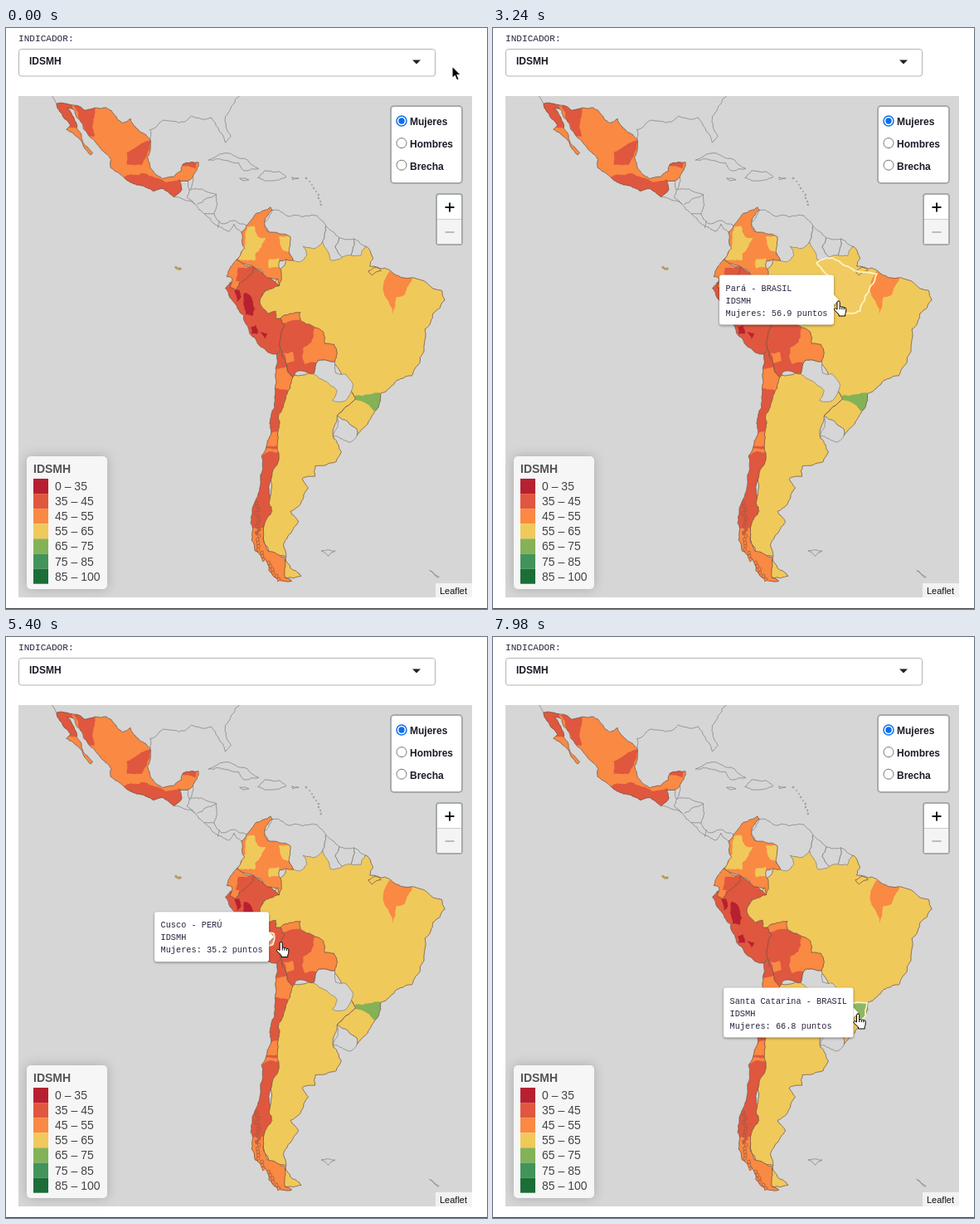
An HTML page for the animation above (8000 ms loop, 580 by 700 pixels).

```html
<!DOCTYPE html>
<html lang="es">
<head>
<meta charset="utf-8">
<title>Mapa IDSMH</title>
<style>
  html, body { margin: 0; width: 100%; height: 100%; overflow: hidden; background: #fff; }
  svg { display: block; }
  text { font-family: "Liberation Sans", Arial, sans-serif; white-space: pre; }
  .mono { font-family: "Liberation Mono", "Noto Sans Mono", monospace; fill: #29243f; }
  .bold { font-weight: bold; font-size: 12px; fill: #1c1a28; }
  .panel { fill: #fff; stroke: #a5abab; stroke-width: 2; }
  .legend { filter: drop-shadow(0 0 7px rgba(0,0,0,.2)); }
  #tip rect, #tip path { fill: #fff; }
  #tip { filter: drop-shadow(0 1px 1.5px rgba(0,0,0,.45)); }
</style>
</head>
<body>
<svg width="580" height="700" viewBox="0 0 580 700">
  <defs><clipPath id="frame"><rect x="15" y="82" width="547" height="604"/></clipPath></defs>
  <rect y="699" width="580" height="1" fill="#444"/>
  <text class="mono" x="15" y="16" font-size="11.1">INDICADOR:</text>
  <rect x="15.5" y="25.5" width="502" height="32.5" rx="3" fill="#fff" stroke="#b3b3b3"/>
  <text class="bold" x="28" y="44">IDSMH</text>
  <path d="M490 38.500h10l-5 5z" fill="#222"/>

  <rect x="15" y="82" width="547" height="604" fill="#d6d6d6"/>
  <g id="map" clip-path="url(#frame)" stroke-linejoin="round"></g>

  <rect class="panel" x="464" y="94" width="86" height="93" rx="4"/>
  <g id="radios"></g>
  <rect class="panel" x="519" y="200" width="31" height="61" rx="3"/>
  <path d="M520 231h29v29h-29z" fill="#f4f4f4"/>
  <path d="M520 230.500h29" stroke="#ccc"/>
  <path d="M529.500 216h11m-5.500-5.500v11" stroke="#111" stroke-width="2"/>
  <path d="M529.500 246h11" stroke="#bbb" stroke-width="2"/>

  <rect class="legend" x="25" y="516" width="97" height="160" rx="5" fill="#f6f6f6"/>
  <text x="33" y="536" font-size="14" font-weight="bold" fill="#555">IDSMH</text>
  <g id="legend"></g>
  <rect x="518" y="669" width="44" height="17" fill="#f2f2f2"/>
  <text x="523" y="682" font-size="11" fill="#111">Leaflet</text>

  <g id="tip" font-size="10.25">
    <rect height="60" rx="3"/>
    <path/>
    <text class="mono" x="7.500" y="19"></text>
    <text class="mono" x="7.500" y="34">IDSMH</text>
    <text class="mono" x="7.500" y="49"></text>
  </g>
  <path id="arrow" d="M0 0V14.500L3.300 11.600 5.600 17 8.300 15.800 6 10.600H10.500Z" fill="#000" stroke="#fff" stroke-width="1.100"/>
  <path id="hand" d="M0 10V1.600a1.600 1.600 0 0 1 3.200 0V7q1.500-1 2.600.3 1.500-.8 2.500.5 2.200-.4 2.400 1.500V12q0 2-1 3.500V18H2V16L-3.300 11q-1-1.600.5-2.200Q-1.500 8.600 0 10zM3.200 7v3M5.800 7.500v2.700M8.300 8v2.400" fill="#fff" stroke="#000"/>
</svg>
<script>
const DEEP = '#b72031', RED = '#df573e', ORANGE = '#f98943', YELLOW = '#f0c95b', GREEN = '#84b256', GREY = '#d6d6d6';
const $ = id => document.getElementById(id);
const map = $('map');

function add(parent, tag, attrs, text) {
  const node = document.createElementNS('http://www.w3.org/2000/svg', tag);
  for (const key in attrs) node.setAttribute(key, attrs[key]);
  if (text) node.textContent = text;
  parent.append(node);
  return node;
}

// Web Mercator; places are written as "degrees west,degrees north".
const project = ([west, north]) =>
  [727 - 5.689 * west, 287 - 326 * Math.asinh(Math.tan(north * Math.PI / 180))];

const noise = n => { const v = Math.sin(n) * 43758.5453; return v - Math.floor(v) - 0.5; };

// Roughens an edge by displacing midpoints, alike in either direction.
function bend(a, b) {
  const dx = b[0] - a[0], dy = b[1] - a[1];
  if (Math.hypot(dx, dy) < 4) return [b];
  const side = dx > 0 || (dx === 0 && dy > 0) ? 1 : -1;
  const k = side * 0.24 * noise((a[0] + b[0]) * 12.9898 + (a[1] + b[1]) * 78.233);
  const mid = [(a[0] + b[0]) / 2 - dy * k, (a[1] + b[1]) / 2 + dx * k];
  return [...bend(a, mid), ...bend(mid, b)];
}

function outline(places, closed = true) {
  const pts = places.split(' ').map(p => project(p.split(',').map(Number)));
  if (closed) pts.push(pts[0]);
  const line = [pts[0], ...pts.slice(1).flatMap((p, i) => bend(pts[i], p))];
  return 'M' + line.map(p => p.map(v => v.toFixed(1))).join('L') + (closed ? 'Z' : '');
}

const stroke = (d, color = '#808080', fill = 'none') =>
  add(map, 'path', { d, fill, stroke: color, 'stroke-width': 0.75 });
const coast = places => stroke(outline(places, false));
const band = (north, south) => `78,${north} 65,${north} 65,${south} 78,${south}`;
const dot = (cx, cy, r, fill, color = '#808080') =>
  add(map, 'circle', { cx, cy, r, fill, stroke: color, 'stroke-width': 0.7 });

// Paints one country; regions may overflow, as they are clipped to it.
let clips = 0;
function land(places, fill = GREY, regions = []) {
  const d = outline(places), id = 'land' + clips++;
  add(add(map, 'clipPath', { id }), 'path', { d });
  const group = add(map, 'g', { 'clip-path': `url(#${id})` });
  add(group, 'path', { d, fill });
  for (const [color, area] of regions) add(group, 'path', { d: outline(area), fill: color });
  stroke(d, fill === GREY ? '#808080' : '#70503f');
}

// North and Central America
coast('118.5,34.2 117.1,32.5');
coast('97.2,25.9 97.3,27.8 94.5,29.5 90,29.2 88.5,30.3 84.3,30 82.8,28 81.3,25.3 80.1,26.5 81.3,30.2 78,34.2');
coast('92.2,14.5 90,13.9 87.7,13 85.8,11 83.7,9 80.4,7.4 79.5,8.9 77.9,7.2');
coast('88.2,18.5 88.9,15.9 86,16 83.2,15 83.7,11 82.2,9 79.6,9.6 76.8,8.6');
coast('91,17.8 89.2,17.8 88.9,15.9 89.4,14.4 87.7,13');
coast('83.2,15 87.3,13');
coast('83.7,11 85.7,11.1');
coast('82.6,9.6 82.9,8.1');
land('84.9,21.9 82.5,23.1 79.5,22.8 74.2,20.2 77.5,19.9 78.5,21.4');
land('74.4,18.4 73,19.8 70,19.7 68.4,18.6 71.4,17.8');
land('78.3,18.3 76.3,18 77.5,17.8');
land('67.2,18.5 65.7,18.3 67,18');
for (let i = 0; i < 9; i++)
  dot(363 + 16 * Math.sin(i * 0.19) + 2 * noise(i), 181 + i * 4, 0.5 + Math.abs(noise(i)), GREY);

land('117.1,32.5 114.8,32.5 111.1,31.3 106.5,31.8 104.9,30.6 103.1,29 101.4,29.8 99.5,27.5 97.2,25.9 97.8,22.5 96.4,19.4 94.6,18.2 92.2,18.6 90.6,19.8 90.3,21.1 87,21.5 88.2,18.5 89.2,17.8 91,17.8 90.5,16.1 92.2,14.5 94.5,16.2 96.5,15.7 102.2,17.9 105.6,20.4 105.5,22 109.4,26 112.8,30 113.2,31.3 114.8,31.7 112.8,28 109.4,23.3 109.9,22.9 112.3,26.1 115,27.8 114.1,28.5 115.8,30.3', ORANGE, [
  [RED, '118,34 114.5,34 112.5,28 117,28'],
  [RED, '113.5,32 109,32 109,26.5 110.5,26.5'],
  [RED, '97,25.8 100,24.6 102.2,23.5 102.2,21 99,21 98,22.6'],
  [RED, '104,18 98.5,19.3 94,17.5 91,18.2 90,14 102,15'],
  [RED, '91,20.8 87.6,20.2 87.6,22 91,22']
]);

// South America, from the back to the front
land('62,-21.5 57,-24 54.6,-25.6 53.7,-27 57.6,-30.2 58.4,-34.2 56.7,-36.6 57.8,-38.2 62.2,-38.9 62.3,-40.6 65,-41 63.7,-42.4 65.3,-44.8 67.5,-46 65.8,-47.5 69,-50.8 68.4,-52.3 72.3,-52 73.2,-50 72,-44 70.3,-30 67.2,-22.5', YELLOW);
land('64.8,4.2 60.2,5.2 56,3 51.6,4.2 50,1.8 50.7,0 44.6,-2 39.5,-3 37.2,-4.8 35.4,-5.2 34.8,-7.2 39,-13.2 39.2,-17.8 41.8,-22.6 45,-23.5 48.4,-26 48.8,-28.5 52.2,-32.5 53.4,-33.7 53.4,-32.6 57.6,-30.2 53.7,-27 54.6,-25.6 56,-23 58.5,-20 61,-16.5 61.5,-14 65.8,-12 72.5,-10.5 74.5,-7 70.5,-3 68.5,1 66,3', YELLOW, [
  [ORANGE, '46.5,-1 41.7,-2.4 43.2,-6 45,-6.5 45.8,-10.2 46.5,-8 47.8,-5.5'],
  [GREEN, '53.8,-26.4 48,-26 48.5,-29.3 49.8,-29.3 51.3,-28 53.8,-27.2']
]);
stroke(outline('51,-1 49,-0.2 48.3,-1 50.2,-1.9'), '#70503f');
land('71.3,11.8 70,11.8 68.2,10.6 61.9,10.7 60,8.5 60.7,5.2 62.8,3.7 64.8,4.2 64,2.3 65.5,0.9 66.9,1.2 68.5,4 72,7 73.5,9');
land('60,8.5 57.2,6 58,4 56.5,1.9 59,1.3 60.7,5.2');
land('57.2,6 54,5.8 54.6,2.3 56.5,1.9 58,4');
land('54,5.8 51.6,4.2 52.6,2.2 54.6,2.3');
land('62.6,-22.2 61.7,-19.6 58.1,-19.8 57.9,-22.1 55.8,-22.3 54.3,-24.1 54.6,-25.6 55.9,-27.4 58.6,-27.3 57.6,-25.5');
land('57.6,-30.2 53.4,-32.6 53.4,-33.7 54.9,-34.9 58.4,-33.9');
land('80.3,-3.4 81.3,-4.7 79.8,-7.3 76.2,-14 70.4,-18.3 69,-16.3 68.7,-12.5 69.6,-11 70.6,-11 70.6,-9.5 72.3,-10 74,-7.5 72.9,-5.2 69.9,-4.2 72,-2 75.3,0 78,-3', RED, [
  [DEEP, '79.4,-5 78.3,-5 77.9,-6.5 78.8,-7.5'],
  [DEEP, '77.3,-5.6 76.2,-6 75,-9 75.4,-10.4 77,-10.2'],
  [DEEP, '75.9,-12.8 74.8,-12.4 74.4,-14.2 75.7,-14.2'],
  [DEEP, '74,-13.8 72.4,-14 73,-15.2']
]);
land('78.9,1.4 77.4,0.4 75.3,-0.1 75.6,-1.5 78.3,-3.4 79,-5 80.3,-4.4 79.8,-2.6 81,-2.2 80.1,0', ORANGE, [
  [RED, '78.6,-0.3 75,-0.3 77,-3.2 79,-3.2']
]);
land('77.9,7.2 76.8,8.6 74.8,11.1 71.7,12.4 71.3,11.8 73,9.3 72.4,7.4 67.5,6.2 67.8,2.8 66.9,1.2 69.8,1.1 69.9,-4.2 70.1,-2.7 72.5,-2.4 75.3,-0.1 78.9,1.4 77.2,3.8', ORANGE, [
  [YELLOW, '76.7,8.3 75.2,8.5 74,6 72.7,6 75,2.5 75,1.2 78.8,1 77,6'],
  [YELLOW, '70,6.2 67,6.5 67,3 69,3.3'],
  [YELLOW, '72,1.5 70,1.8 69.5,0 72,-0.5']
]);
land('69.5,-17.5 68.7,-12.5 69.6,-11 65.4,-9.7 65.3,-11.5 60.5,-13.8 60.2,-16.2 58.3,-16.3 57.6,-18.2 58.1,-19.8 61.7,-19.6 62.6,-22.2 66.2,-21.8 67,-22.9 68.2,-21.5', RED, [
  [ORANGE, '70,-11.9 65.5,-11.3 65,-9 70,-9'],
  [ORANGE, '62.4,-13 63.1,-16 64.8,-17 64.5,-20.3 57,-20.3 57,-16 60,-13'],
  [ORANGE, '69,-18 67,-17.8 66.7,-19.7 68.4,-20.2']
]);
land('70.4,-18.3 69.5,-17.5 68.2,-21.5 67,-22.9 68.5,-27 70.1,-33 71.6,-41 71.4,-46 73.2,-49.5 72.3,-51.5 68.5,-52.4 68.6,-54.9 67.2,-55.3 71,-54.8 75,-51.5 75.5,-48.5 73.8,-41.5 73.6,-37.2 71.6,-33 71.6,-30 70.5,-24', RED, [
  [ORANGE, band(-21.6, -26)],
  [ORANGE, band(-32.7, -34.3)],
  [ORANGE, band(-36.3, -37)],
  [ORANGE, band(-49, -57)]
]);
land('68.6,-52.6 67.5,-53.7 65.2,-54.7 68.6,-54.9', YELLOW);
for (let i = 0; i < 24; i++) {
  const y = 571 + i * 4, x = 304 + 5 * noise(i + 3) - (y < 630 ? 4 : 630 - y) * 0.7;
  stroke(`M${x} ${y}l3-1 1 3-3 2z`, '#a15a3f', y < 608 ? RED : ORANGE);
}
land('61,-51.5 58,-51.5 59.5,-52.2');
land('38,-54 36,-54.8 36.3,-54.9');
for (let i = 0; i < 3; i++) dot(205 + i * 2.5, 290 + noise(i) * 3, 1.2, YELLOW, '#8a6b3a');

const highlight = add(map, 'path', { fill: '#fff', stroke: '#fff3c4', 'stroke-width': 1.8 });

['Mujeres', 'Hombres', 'Brecha'].forEach((label, i) => {
  const cy = 112 + i * 26.6, on = i === 0;
  add($('radios'), 'circle', { cx: 477, cy, r: 6, fill: '#fff', stroke: on ? '#0b6fee' : '#777', 'stroke-width': on ? 1.5 : 1 });
  if (on) add($('radios'), 'circle', { cx: 477, cy, r: 3.7, fill: '#0b6fee' });
  add($('radios'), 'text', { class: 'bold', x: 487, y: 117 + i * 27 }, label);
});

const bounds = [0, 35, 45, 55, 65, 75, 85, 100];
[DEEP, RED, ORANGE, YELLOW, GREEN, '#42945a', '#1b6e37'].forEach((fill, i) => {
  add($('legend'), 'rect', { x: 33, y: 543 + i * 18.1, width: 18, height: 18.1, fill });
  add($('legend'), 'text', { x: 59, y: 557 + i * 18.1, 'font-size': 14, fill: '#444' }, `${bounds[i]} – ${bounds[i + 1]}`);
});

// Pointer stops: arrival time, departure time, x, y
const stops = [
  [0, 870, 538, 46], [1380, 1650, 500, 72], [2700, 3500, 415, 329], [4300, 4800, 285, 344],
  [5400, 5400, 330, 367.5], [6540, 6540, 421.5, 426], [6880, 8000, 438.5, 454]
];
// Hovered regions: since, name, value, area, fill opacity
const hovers = [
  [2500, 'Pará - BRASIL', 56.9, '59.2,0.7 56,1.8 53.6,0.3 51.1,-1 46.4,-1.6 49.9,-9.4 53,-10 56.8,-8.7 58.5,-6 56.5,-2', 0.04],
  [3900, 'Huánuco - PERÚ', 31.6, '77.3,-8.2 75.8,-8.2 75.8,-9.6 77,-9.6', 0.4],
  [5100, 'Cusco - PERÚ', 35.2, '73.8,-12.2 71,-12.3 71.2,-14.5 72.6,-15', 0.4],
  [6000, 'Mato Grosso do Sul - BRASIL', 62.3, '58,-18.5 56,-17.5 54,-17.8 51,-19.7 52,-22 54,-24 55.5,-23.9 55.8,-22.3 57.9,-22', 0.04],
  [6760, 'Santa Catarina - BRASIL', 66.8, '53.8,-26.4 48.5,-26 48.8,-28.5 49.8,-29.3 51.3,-28 53.8,-27.2', 0.08]
].map(([since, name, value, area, opacity]) => ({ since, name, value, d: outline(area), opacity }));

function pointer(t) {
  const i = stops.findLastIndex(s => t >= s[0]);
  const [, leave, x, y] = stops[i];
  const [arrive, , nextX, nextY] = stops[i + 1] || stops[i];
  const k = t <= leave ? 0 : (t - leave) / (arrive - leave);
  return [x + (nextX - x) * k, y + (nextY - y) * k];
}

const move = (node, x, y) => node.setAttribute('transform', `translate(${x.toFixed(2)} ${y.toFixed(2)})`);
const show = (node, on) => node.setAttribute('visibility', on ? 'visible' : 'hidden');
const tip = $('tip'), tipBox = tip.querySelector('rect'), tipArrow = tip.querySelector('path');
const [tipName, , tipValue] = tip.querySelectorAll('text');
const TIP_LAG = 120;

function draw(t) {
  const [x, y] = pointer(t);
  const hover = hovers.findLast(h => t >= h.since);
  move($('arrow'), x, y);
  move($('hand'), x, y);
  show($('arrow'), !hover);
  for (const node of [$('hand'), tip, highlight]) show(node, hover);
  if (!hover) return;

  highlight.setAttribute('d', hover.d);
  highlight.setAttribute('fill-opacity', hover.opacity);
  tipName.textContent = hover.name;
  tipValue.textContent = `Mujeres: ${hover.value} puntos`;
  const width = Math.max(hover.name.length, 20) * 6.15 + 15;
  const [tx, ty] = pointer(t - TIP_LAG);
  const onRight = tx < 288;
  tipBox.setAttribute('width', width);
  tipArrow.setAttribute('d', onRight ? 'M0 24l-6 6 6 6z' : `M${width} 24l6 6-6 6z`);
  move(tip, onRight ? tx + 7 : tx - 4 - width, ty - 31.5);
}

function tick(now) {
  draw(now % 8000);
  requestAnimationFrame(tick);
}
draw(0);
requestAnimationFrame(tick);
</script>
</body>
</html>
```
